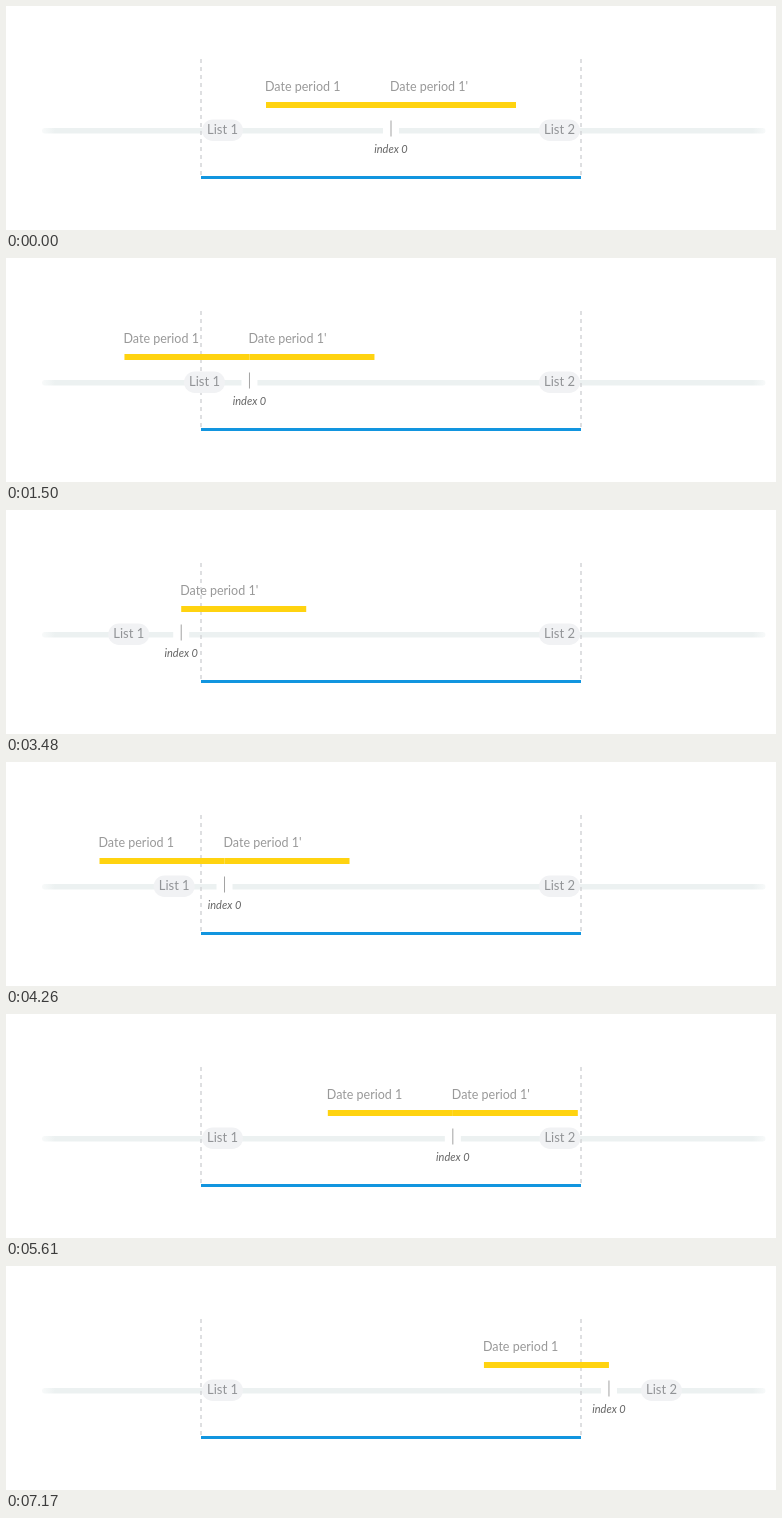
An HTML page that plays this animation: 770x224 px, repeating every 8000 ms.

```html
<!DOCTYPE html>
<html lang="en">
<head>
<meta charset="utf-8">
<title>Date periods on a timeline</title>
<style>
  html, body { margin: 0; width: 100%; height: 100%; overflow: hidden; background: #fff; }
  svg { display: block; width: 770px; height: 224px; }
  text { font-family: Lato, "Open Sans", sans-serif; fill: #999; }
  .date { font-size: 12.5px; }
  .list { font-size: 13px; text-anchor: middle; fill: #929497; }
  .index { font-size: 11px; font-style: italic; text-anchor: middle; fill: #666; }
  .edge { stroke: #d3d5d8; stroke-width: 1.5; stroke-dasharray: 4 4; }
  .bar { fill: #ffd310; }
  .pill { fill: #f1f2f4; }
</style>
</head>
<body>
<svg viewBox="0 0 770 224">
  <defs>
    <linearGradient id="fade" gradientUnits="userSpaceOnUse" x1="36" y1="0" x2="760" y2="0">
      <stop offset="0" stop-color="#f8fafa"/>
      <stop offset=".018" stop-color="#ecf1f1"/>
      <stop offset=".982" stop-color="#ecf1f1"/>
      <stop offset="1" stop-color="#f8fafa"/>
    </linearGradient>
  </defs>
  <rect x="36" y="122" width="723.5" height="5.5" rx="2.75" fill="url(#fade)"/>
  <path class="edge" d="M195 53V170M575 53V170"/>
  <rect x="195" y="170" width="380" height="3" fill="#1295df"/>

  <g id="marker">
    <rect x="-8" y="121" width="16" height="8" fill="#fff"/>
    <rect x="-.5" y="114.5" width="1" height="16" fill="#a3a3a3"/>
    <text class="index" y="147">index 0</text>
    <g id="before">
      <rect class="bar" x="-125" y="96" width="125" height="6"/>
      <text class="date" x="-126" y="85">Date period 1</text>
    </g>
    <g id="after">
      <rect class="bar" y="96" width="125" height="6"/>
      <text class="date" x="-1" y="85">Date period 1'</text>
    </g>
  </g>

  <g id="list1">
    <rect class="pill" x="-20.5" y="113.5" width="41" height="21.5" rx="10.75"/>
    <text class="list" y="128">List 1</text>
  </g>
  <g id="list2">
    <rect class="pill" x="-20.5" y="113.5" width="41" height="21.5" rx="10.75"/>
    <text class="list" y="128">List 2</text>
  </g>
</svg>
<script>
  const LOOP = 8000, LEFT = 195, RIGHT = 575;
  const el = id => document.getElementById(id);
  const parts = Object.fromEntries(
    ['marker', 'before', 'after', 'list1', 'list2'].map(id => [id, el(id)]));

  // Moves: [start ms, end ms, distance]
  const tracks = {
    marker: { home: 385, moves: [[360, 2250, -210], [3420, 7200, 428]] },
    list1: { home: 216.5, moves: [[1175, 2250, -94], [3420, 5130, 94]] },
    list2: { home: 553.5, moves: [[5535, 7200, 102]] }
  };

  // Cubic Bezier (.42, 0, .58, 1), solved by bisection
  function ease(u) {
    if (u <= 0) return 0;
    if (u >= 1) return 1;
    let lo = 0, hi = 1;
    for (let i = 0; i < 24; i++) {
      const s = (lo + hi) / 2, r = 1 - s;
      if (1.26 * s * r * r + 1.74 * s * s * r + s * s * s < u) lo = s;
      else hi = s;
    }
    return lo * lo * (3 - 2 * lo);
  }

  const position = ({ home, moves }, t) => moves.reduce(
    (x, [from, to, dist]) => x + dist * ease((t - from) / (to - from)), home);

  const show = (node, on) => node.setAttribute('visibility', on ? 'visible' : 'hidden');

  function render(t) {
    for (const id in tracks) {
      const x = position(tracks[id], t);
      parts[id].setAttribute('transform', `translate(${x.toFixed(2)} 0)`);
    }
    const index = position(tracks.marker, t);
    show(parts.before, index >= LEFT);
    show(parts.after, index <= RIGHT);
  }

  const start = performance.now();
  function tick() {
    render((performance.now() - start) % LOOP);
    requestAnimationFrame(tick);
  }
  render(0);
  requestAnimationFrame(tick);
</script>
</body>
</html>
```
